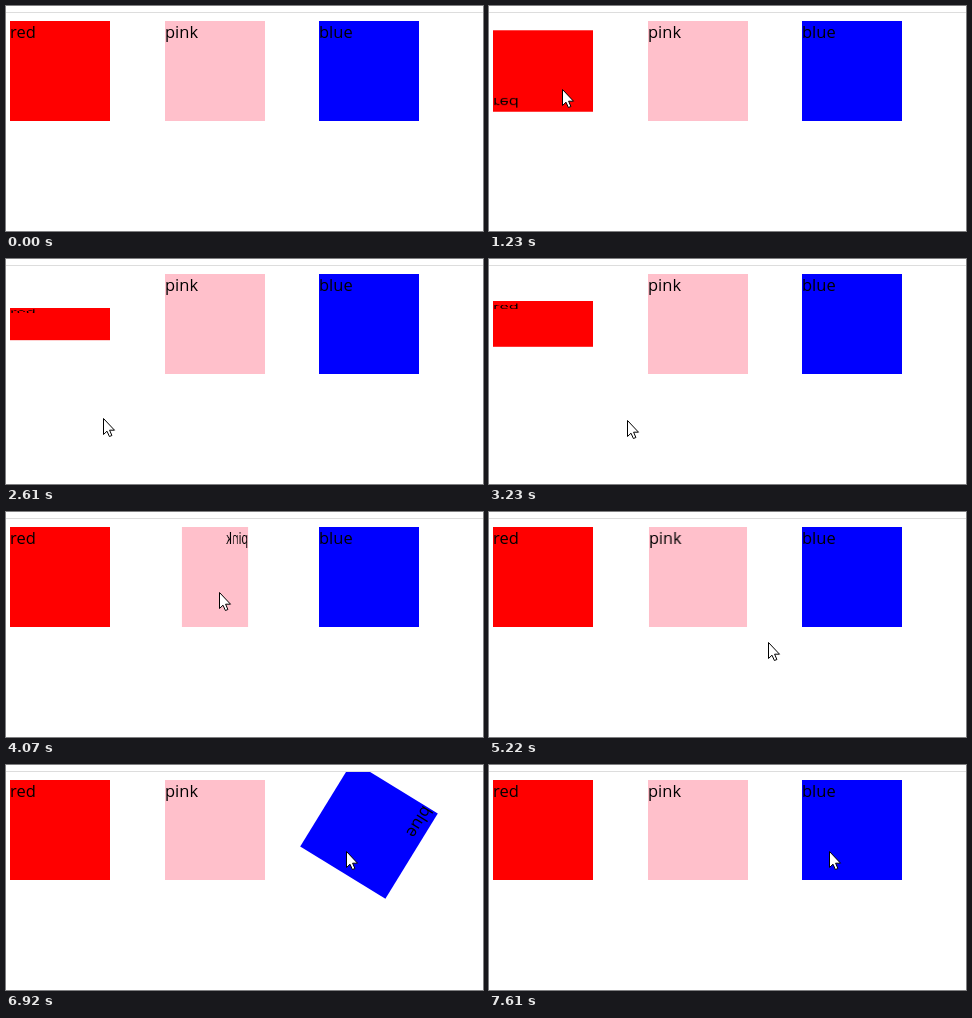
An HTML page for the animation above (8 s loop, 477 px wide and 225 px high).

```html
<!DOCTYPE html>
<html lang="en">
<head>
<meta charset="utf-8">
<title>Rotating boxes</title>
<style>
  html, body { margin: 0; width: 100%; height: 100%; overflow: hidden; background: #fff; }
  .rule { position: absolute; left: 0; top: 6px; width: 477px; height: 1px; background: #ddd; }
  .view { position: absolute; left: 0; top: 7px; width: 477px; height: 218px; overflow: hidden; }
  .box {
    position: absolute; top: 8px; width: 100px; height: 100px;
    font: 16.5px/21px "Open Sans", "Noto Sans", sans-serif; color: #000;
  }
  #red { left: 4px; background: red; }
  #pink { left: 159px; background: pink; }
  #blue { left: 313px; background: blue; }
  #cursor { position: absolute; left: 0; top: 0; visibility: hidden; }
</style>
</head>
<body>
<div class="rule"></div>
<div class="view">
  <div class="box" id="red">red</div>
  <div class="box" id="pink">pink</div>
  <div class="box" id="blue">blue</div>
</div>
<svg id="cursor" width="13" height="20">
  <path d="M.5 .5V16.5L4 13.2L6.4 18.5L8.9 17.5L6.6 12.2H11.5Z" fill="#fff" stroke="#000"/>
</svg>
<script>
const LOOP = 8000, STEP = 76.9, SPIN = 980;

// Hover start and end, in ms
const boxes = [
  { id: 'red', axis: 'X', enter: 837, leave: 2421 },
  { id: 'pink', axis: 'Y', enter: 3718, leave: 5198 },
  { id: 'blue', axis: 'Z', enter: 6590, leave: Infinity }
];

// The pointer appears at `entry`, then glides to each stop
const entry = { at: 460, x: 258, y: 203 };
const moves = [
  { from: 460, to: 1000, x: 73, y: 83 },
  { from: 2230, to: 2614, x: 97, y: 159 },
  { from: 3080, to: 3460, x: 215, y: 164 },
  { from: 3540, to: 3850, x: 213, y: 80 },
  { from: 5000, to: 5360, x: 308, y: 151 },
  { from: 6460, to: 6720, x: 340, y: 86 }
];

const el = id => document.getElementById(id);
const ramp = (t, from, to) => Math.min(1, Math.max(0, (t - from) / (to - from)));
const smooth = f => f * f * (3 - 2 * f);
const cursor = el('cursor');

function pointer(t) {
  let { x, y } = entry;
  for (const m of moves) {
    const f = smooth(ramp(t, m.from, m.to));
    x += (m.x - x) * f;
    y += (m.y - y) * f;
  }
  return [Math.round(x), Math.round(y)];
}

function draw(ms) {
  // The screen updates 13 times a second, on a 10 ms clock
  const t = Math.floor((ms + 9.5) / STEP) * STEP;
  for (const { id, axis, enter, leave } of boxes) {
    const turn = ramp(t, enter, enter + SPIN) - (t > leave ? ramp(t, leave, leave + SPIN) : 0);
    el(id).style.transform = turn % 1 ? `rotate${axis}(${turn * 360}deg)` : 'none';
  }
  const [x, y] = pointer(t);
  cursor.style.visibility = t < entry.at ? 'hidden' : 'visible';
  cursor.style.transform = `translate(${x}px, ${y}px)`;
}

const start = performance.now();
function tick() {
  draw((performance.now() - start) % LOOP);
  requestAnimationFrame(tick);
}
tick();
</script>
</body>
</html>
```
